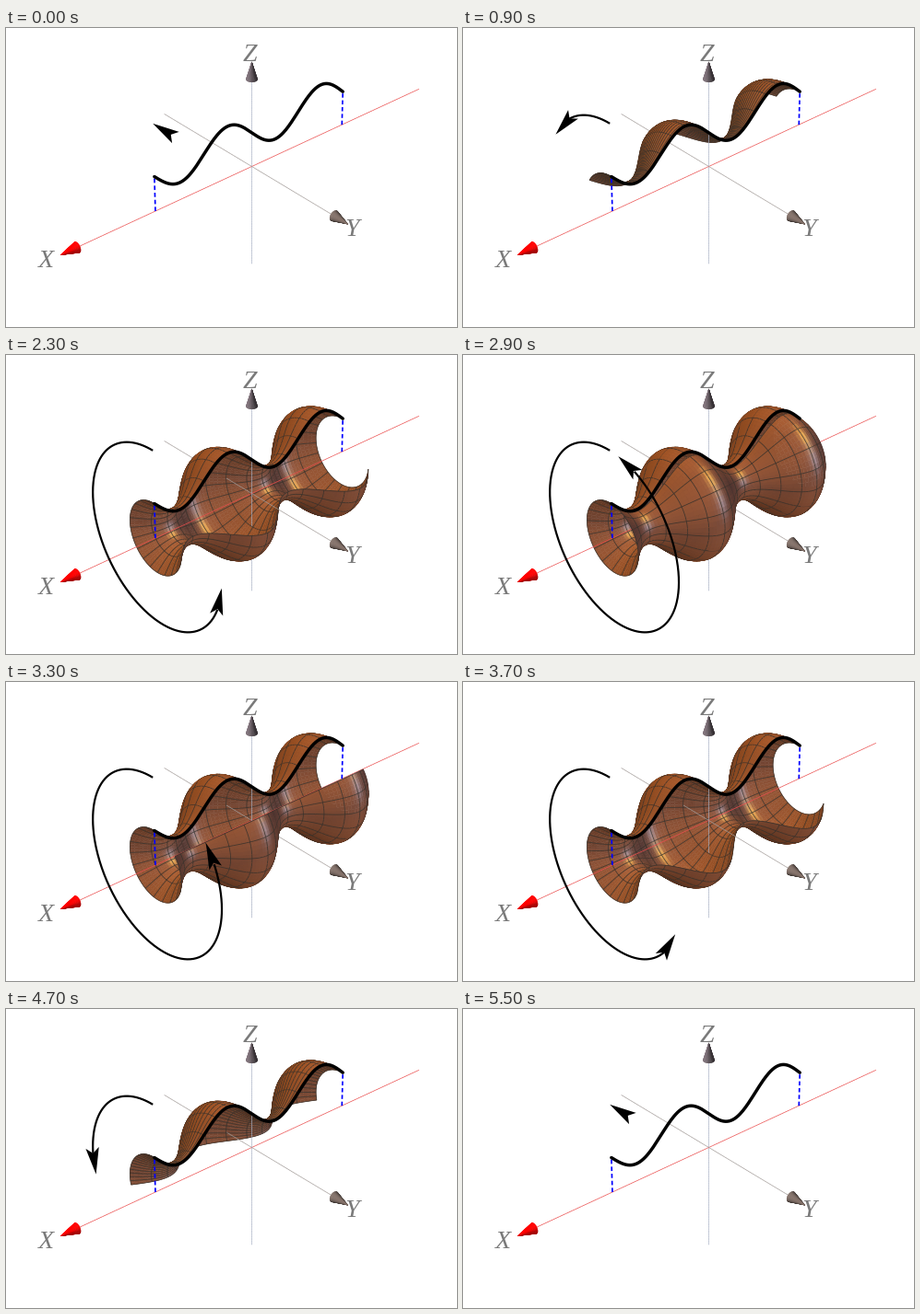
Write a matplotlib script that moves like this. It is 489 px wide and 325 px high and loops after 6000 ms.

```python
import numpy as np
import matplotlib.pyplot as plt
from matplotlib.animation import FuncAnimation
from matplotlib.collections import PolyCollection
from matplotlib.patches import Polygon

W, H, DPI = 489, 325, 64
PT = 72 / DPI                      # points per pixel
TAU = 2 * np.pi

# Perspective camera looking at the origin
AZ, EL = np.radians(48.7), np.radians(31.9)
SCALE, DIST = 21.4, 105.0
CENTER = np.array([266.5, 150.5])
RIGHT = np.array([-np.sin(AZ), np.cos(AZ), 0])
UP = np.array([-np.cos(AZ) * np.sin(EL), -np.sin(AZ) * np.sin(EL), np.cos(EL)])
VIEW = np.array([np.cos(AZ) * np.cos(EL), np.sin(AZ) * np.cos(EL), np.sin(EL)])

AXIS_LEN = (12, 7, 6)
AXIS_COLORS = ((0.92, 0.30, 0.30), (0.64, 0.61, 0.60), (0.66, 0.69, 0.77))
CONE_COLORS = ((1.0, 0.0, 0.0), (0.50, 0.43, 0.40), (0.48, 0.43, 0.46))
BLUE = (0.0, 0.0, 1.0)
MESH = (0.20, 0.19, 0.17, 0.85)
ARC_RADIUS = 5
START = 0.05                       # angle at which the sweep begins
INTERVALS = 16                     # mesh intervals in each direction


def project(p):
    k = SCALE / (1 - p @ VIEW / DIST)
    return CENTER + np.stack([k * (p @ RIGHT), -k * (p @ UP)], axis=-1)


def unit(v):
    v = np.asarray(v, float)
    return v / np.linalg.norm(v, axis=-1, keepdims=True)


def radius(x):
    return 2 + np.sin(x)


def spin(x, r, t):
    """Point at distance r from the x axis, turned by t from the z axis."""
    x, r, t = np.broadcast_arrays(x, r, t)
    return np.stack([x, -r * np.sin(t), r * np.cos(t)], axis=-1)


def rgba(color, n):
    c = np.ones(4)
    c[:len(color)] = color
    return np.tile(c, (n, 1))


def strokes(a, b, color, width, bias=0.0):
    """Line segments as flat quads, so they can be depth sorted with faces."""
    quads = np.stack([a, b, b, a], axis=1)
    c = rgba(color, len(a))
    return quads, c * [1, 1, 1, 0], c, np.full(len(a), width * PT), np.full(len(a), bias)


def faces(quads, colors, bias=0.0):
    n = len(quads)
    c = np.column_stack([colors, np.ones(n)])
    return quads, c, c, np.full(n, 0.45 * PT), np.full(n, bias)


def shade(points, normals):
    """Copper surface with soft lamps and a yellow and a lavender highlight."""
    n = unit(normals)
    away = np.sum(n * (DIST * VIEW - points), axis=-1) < 0
    n = np.where(away[:, None], -n, n)
    n = n @ np.stack([RIGHT, UP, VIEW], axis=1)

    def lamp(direction, power=1):
        return np.clip(n @ unit(direction), 0, 1)[:, None] ** power

    col = np.array([0.21, 0.125, 0.10])
    col = col + lamp((-0.40, 0.75, 0.50)) * [0.40, 0.19, 0.03]
    col = col + lamp((0.30, -0.85, 0.30)) * [0.20, 0.10, 0.03]
    col = col + lamp((0.60, 0.10, 0.80)) * [0.14, 0.11, 0.12]
    col = col + lamp((0.42, 0.42, 0.80), 40) * [0.36, 0.34, 0.10]
    col = col + lamp((0.62, 0.06, 0.78), 30) * [0.13, 0.22, 0.31]
    return np.clip(col, 0, 1)


def cone(axis):
    e, a, b = np.roll(np.eye(3), -axis, axis=0)
    ang = np.linspace(0, TAU, 41)[:, None]
    tip = e * (AXIS_LEN[axis] + 0.05)
    rim = tip - 0.97 * e + 0.28 * (np.cos(ang) * a + np.sin(ang) * b)
    p, q = rim[:-1], rim[1:]
    tips = np.broadcast_to(tip, p.shape)
    n = unit(np.cross(q - p, tips - p))
    front = n @ VIEW > -0.05
    lamp = unit(-0.7 * RIGHT + 0.45 * UP + 0.55 * VIEW)
    light = np.clip(0.50 + 0.65 * (n @ lamp), 0.45, 1.1)
    if axis == 0:
        light = np.clip(light + 0.2, 0.6, 1)
    col = np.clip(light[:, None] * np.array(CONE_COLORS[axis]), 0, 1)
    return faces(np.stack([p, q, tips, tips], axis=1)[front], col[front])


def axis_line(axis):
    e = np.eye(3)[axis]
    s = np.linspace(-AXIS_LEN[axis], AXIS_LEN[axis] - 0.9, 121)[:, None]
    pts = s * e
    return strokes(pts[:-1], pts[1:], AXIS_COLORS[axis], 0.7)


def dashes(x):
    z = np.arange(5) * 0.41
    a = np.stack([np.full(5, x), np.zeros(5), z], axis=1)
    return strokes(a, a + [0, 0, 0.25], BLUE, 1.7, 0.05)


STATIC = [f(i) for i in range(3) for f in (axis_line, cone)]
STATIC += [dashes(TAU), dashes(-TAU)]


def surface(t):
    nx = INTERVALS * 5
    nt = INTERVALS * (2 if t < np.pi else 4)
    x = np.linspace(-TAU, TAU, nx + 1)[:, None]
    a = np.linspace(0, t, nt + 1)[None, :]
    p = spin(x, radius(x), a)
    quads = np.stack([p[:-1, :-1], p[1:, :-1], p[1:, 1:], p[:-1, 1:]], axis=2)
    quads = quads.reshape(-1, 4, 3)

    xm, am = (x[1:] + x[:-1]) / 2, (a[:, 1:] + a[:, :-1]) / 2
    normals = spin(-np.cos(xm), 1.0, am).reshape(-1, 3)
    parts = [faces(quads, shade(quads.mean(axis=1), normals))]

    rings = p[::nx // INTERVALS]
    ribs = p[:, ::nt // INTERVALS]
    for u, v in ((rings[:, :-1], rings[:, 1:]), (ribs[:-1], ribs[1:])):
        parts.append(strokes(u.reshape(-1, 3), v.reshape(-1, 3), MESH, 0.8, 0.1))
    return parts


fig = plt.figure(figsize=(W / DPI, H / DPI), dpi=DPI, facecolor="white")
ax = fig.add_axes([0, 0, 1, 1])
ax.set_xlim(0, W)
ax.set_ylim(H, 0)
ax.axis("off")

scene = PolyCollection([], zorder=1)
scene.set_snap(False)
ax.add_collection(scene, autolim=False)

xs = np.linspace(-TAU, TAU, 200)
cx, cy = project(spin(xs, radius(xs), 0.0)).T
ax.plot(cx, cy, color="black", lw=3.5 * PT, zorder=2, solid_capstyle="round")

arc, = ax.plot([], [], color="black", lw=2.2 * PT, zorder=3, solid_capstyle="butt")
head = Polygon(np.zeros((4, 2)), closed=True, fc="black", ec="none", zorder=4)
ax.add_patch(head)

for name, x, y in (("X", 43.5, 260), ("Y", 375, 226), ("Z", 264.5, 36.5)):
    ax.text(x, y, name, family="Liberation Serif", style="italic",
            fontsize=28 * PT, color="0.48", ha="center", va="baseline", zorder=5)


def draw_scene(t):
    parts = STATIC + (surface(t) if t > 0 else [])
    quads, fc, ec, lw, bias = (np.concatenate(c) for c in zip(*parts))
    order = np.argsort(quads.mean(axis=1) @ VIEW + bias, kind="stable")
    scene.set_verts(project(quads[order]))
    scene.set_facecolor(fc[order])
    scene.set_edgecolor(ec[order])
    scene.set_linewidth(lw[order])


def draw_arrow(t):
    length, notch, half = 29, 23, 7.2
    path = project(spin(TAU, ARC_RADIUS, np.linspace(0, t, 300)))
    tip = path[-1]
    steps = np.linalg.norm(np.diff(path, axis=0), axis=1)
    to_tip = np.append(np.cumsum(steps[::-1])[::-1], 0)
    shaft = path[to_tip > notch]
    if len(shaft):
        d = unit(tip - shaft[-1])
    else:
        d = unit(tip - project(spin(TAU, ARC_RADIUS, t - 0.01)))
    arc.set_data(*shaft.T)
    side = np.array([-d[1], d[0]]) * half
    back = tip - length * d
    head.set_xy([tip, back + side, tip - notch * d, back - side])


def sweep_angle(i):
    """Rest at zero, sweep open and closed again, rest."""
    if not 5 <= i < 55:
        return 0.0
    part = 1 - abs((i - 5) / 24.5 - 1)
    return START + (TAU - START) * part


def update(i):
    t = sweep_angle(i)
    draw_scene(t)
    draw_arrow(t)
    return scene, arc, head


anim = FuncAnimation(fig, update, frames=60, interval=100, repeat=True,
                     repeat_delay=0, blit=False, cache_frame_data=False)
plt.show()
```
